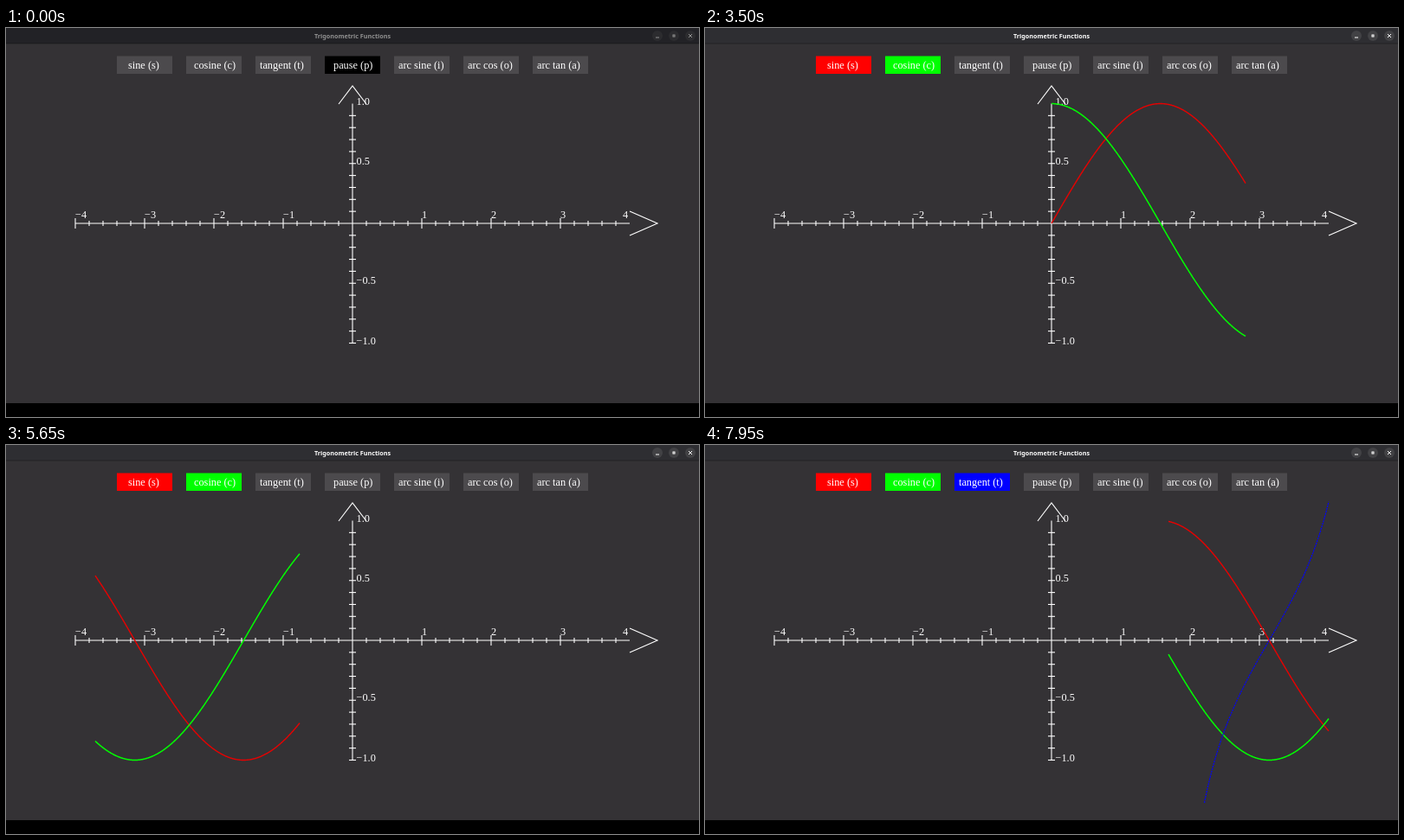
These frames come from a looping animation (800x450 px, 8 s). An HTML page with a canvas:

```html
<!DOCTYPE html>
<html lang="en">
<head>
<meta charset="utf-8">
<title>Trigonometric Functions</title>
<style>
  html, body { margin: 0; width: 100%; height: 100%; overflow: hidden; background: #000; }
  canvas { display: block; }
</style>
</head>
<body>
<canvas id="stage" width="800" height="450"></canvas>
<script>
const ctx = document.getElementById('stage').getContext('2d');
const LOOP = 8000, STEP = 50;
const OX = 400, OY = 226, UNIT_X = 80, UNIT_Y = 138.5, LEFT = 80, RIGHT = 720;
const SINE_ON = 1050, COSINE_ON = 3150, TANGENT_ON = 7400;
const SERIF = '12.3px "Liberation Serif", "Times New Roman", serif';

// label, text x, highlight colour, active at time t
const buttons = [
  ['sine (s)', 141, '#f00', t => t >= SINE_ON],
  ['cosine (c)', 217, '#0f0', t => t >= COSINE_ON],
  ['tangent (t)', 293, '#00f', t => t >= TANGENT_ON],
  ['pause (p)', 378, '#000', t => t < SINE_ON],
  ['arc sine (i)', 453],
  ['arc cos (o)', 533],
  ['arc tan (a)', 613]
];

// time, tail x, head x; each sweep starts again from the left
const sweep = [
  [1050, 605, 840],
  [1070, -150, 80], [1450, 88, 324], [2560, 610, 840],
  [2560, -150, 80], [3500, 400, 624], [3926, 610, 838],
  [3926, -150, 80], [4400, 147, 376], [4650, 287, 516], [5245, 605, 840],
  [5245, -150, 80], [5650, 103, 339], [6650, 575, 811], [6750, 615, 845],
  [6750, -150, 80], [7800, 462, 687], [7950, 535, 763]
];

const mix = (a, b, k) => a + (b - a) * k;
const grey = (a, b, k, blue = 0) => {
  const v = Math.round(mix(a, b, k));
  return `rgb(${v},${v},${v + blue})`;
};

function rect(color, x, y, w, h) {
  ctx.fillStyle = color;
  ctx.fillRect(x, y, w, h);
}

function line(...points) {
  ctx.beginPath();
  for (let i = 0; i < points.length; i += 2) ctx.lineTo(points[i], points[i + 1]);
  ctx.stroke();
}

function titleBar(focus) {
  rect(grey(34, 46, focus, 4), 0, 0, 800, 18);
  rect('rgba(0,0,0,.3)', 0, 17.5, 800, 1);
  ctx.font = 'bold 7.2px "Noto Sans", sans-serif';
  ctx.textAlign = 'center';
  const ink = grey(145, 255, focus);
  ctx.fillStyle = ink;
  ctx.fillText('Trigonometric Functions', 400, 12);
  ctx.textAlign = 'left';
  for (const x of [752, 771, 790]) {
    ctx.fillStyle = grey(44, 66, focus, 3);
    ctx.beginPath();
    ctx.arc(x, 9, 6, 0, 7);
    ctx.fill();
  }
  ctx.strokeStyle = ink;
  ctx.lineWidth = 1;
  line(750, 11, 754, 11);
  ctx.strokeRect(770, 8, 2, 2);
  line(788, 7, 792, 11);
  line(792, 7, 788, 11);
}

function drawButtons(t) {
  ctx.font = SERIF;
  buttons.forEach(([label, x, color, active], i) => {
    rect(active && active(t) ? color : '#4c4a4d', 128 + 80 * i, 32.5, 64, 20.5);
    ctx.fillStyle = '#fff';
    ctx.fillText(label, x, 47);
  });
}

function drawAxes() {
  ctx.strokeStyle = ctx.fillStyle = '#fff';
  ctx.lineWidth = 1.1;
  line(LEFT, OY, RIGHT, OY);
  line(OX, OY - UNIT_Y, OX, OY + UNIT_Y);
  line(384, 88, OX, 67, 416, 88);
  line(RIGHT, 212, 752, OY, RIGHT, 240);
  for (let i = -20; i < 20; i++) {
    const x = OX + i * 16, h = i % 5 ? 3 : 6;
    if (i) line(x, OY - h, x, OY + h);
  }
  for (let i = -10; i < 10; i++) {
    const y = OY - i * UNIT_Y / 10;
    if (i) line(396, y, 404, y);
  }
  ctx.font = SERIF;
  for (let i = -4; i <= 4; i++) {
    if (i) ctx.fillText(String(i).replace('-', '−'), i === 4 ? 712 : OX + i * UNIT_X, 220);
  }
  for (const v of [1, 0.5, -0.5, -1]) {
    ctx.fillText(v.toFixed(1).replace('-', '−'), 404.5, OY - v * UNIT_Y + 1);
  }
}

function plot(fn, color, width, from, to, dash = []) {
  ctx.strokeStyle = color;
  ctx.lineWidth = width;
  ctx.setLineDash(dash);
  ctx.beginPath();
  let pen = false;
  for (let x = from; x <= to; x += 0.5) {
    const v = fn((x - OX) / UNIT_X);
    const visible = Math.abs(v) < 1.36;
    if (visible) ctx[pen ? 'lineTo' : 'moveTo'](x, OY - v * UNIT_Y);
    pen = visible;
  }
  ctx.stroke();
  ctx.setLineDash([]);
}

function drawCurves(t) {
  const i = Math.max(1, sweep.findIndex(([time]) => time > t));
  const n = t >= sweep[sweep.length - 1][0] ? sweep.length - 1 : i;
  const [t0, tail0, head0] = sweep[n - 1], [t1, tail1, head1] = sweep[n];
  const k = (t - t0) / (t1 - t0);
  const from = Math.max(LEFT, mix(tail0, tail1, k));
  const to = Math.min(RIGHT, mix(head0, head1, k));
  const both = t >= COSINE_ON;
  plot(Math.sin, both ? '#e80000' : '#f00', both ? 1.4 : 1.7, from, to);
  if (both) plot(Math.cos, '#0f0', 1.5, from, to);
  if (t >= TANGENT_ON) plot(Math.tan, '#00f', 1.2, from, to, [2, 1]);
}

function render(t) {
  rect('#343235', 0, 0, 800, 434);
  rect('#000', 0, 434, 800, 16);
  titleBar(Math.min(1, t / 250));
  drawButtons(t);
  drawAxes();
  if (t >= SINE_ON) drawCurves(t);
}

function tick() {
  render(Math.floor(performance.now() % LOOP / STEP) * STEP);
  requestAnimationFrame(tick);
}
tick();
</script>
</body>
</html>
```
